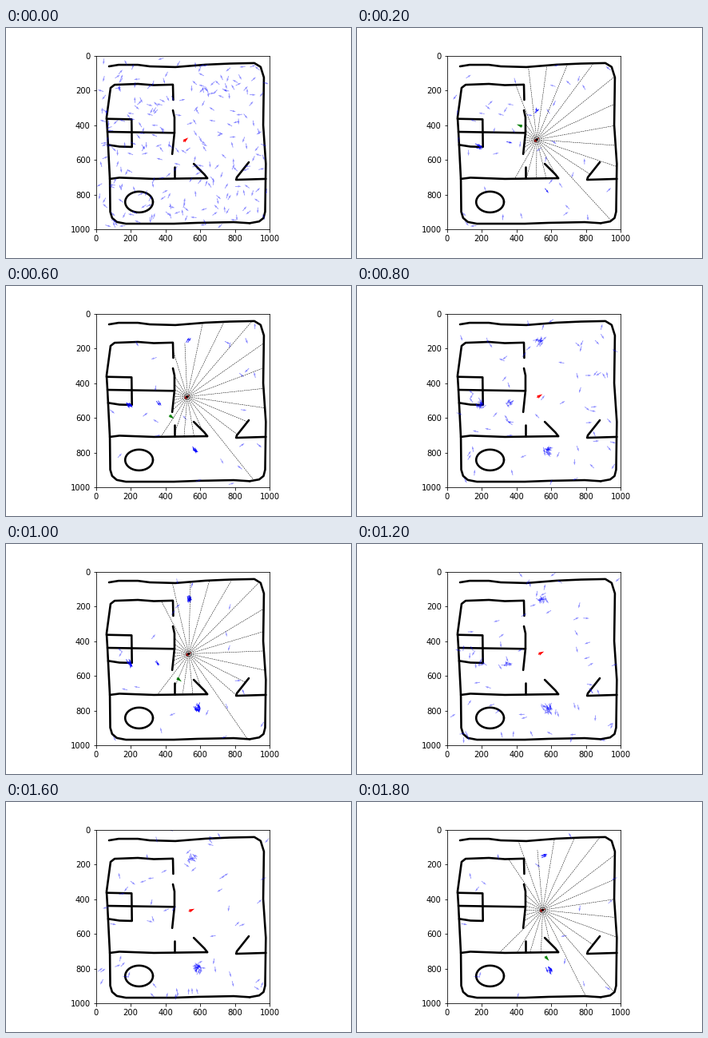
These frames come from a looping animation (432x288 px, 2 s). A matplotlib script:

```python
import numpy as np
import matplotlib.pyplot as plt
from matplotlib.animation import FuncAnimation

FRAMES, INTERVAL = 10, 200
SCALE = 4.6                        # map units per screen pixel
CORNER = np.array([112.7, 34.6])   # top left of the map on screen
RAYS = 25

# Floor plan, in map units
t = np.linspace(0, 2 * np.pi, 41)
table = np.column_stack([248 + 80 * np.cos(t), 843 + 60 * np.sin(t)])
north_east = [(75, 62), (130, 53), (241, 53), (310, 62), (457, 66), (632, 52),
              (770, 46), (912, 43), (948, 65), (967, 126), (963, 400), (978, 623),
              (974, 899), (965, 935), (940, 955), (885, 965)]
south_west = [(885, 965), (793, 959), (586, 963), (448, 968), (172, 968),
              (120, 958), (93, 935), (82, 899), (80, 715), (66, 439), (61, 356),
              (84, 186), (107, 168), (241, 163), (333, 170), (443, 167), (445, 255)]
partition = [(443, 315), (452, 356), (452, 443), (439, 567)]
divider = [(66, 439), (452, 445)]
closet = [(61, 364), (205, 367), (207, 526), (135, 524), (70, 514)]
hall = [(80, 710), (135, 703), (333, 710), (641, 706)]
stub = [(454, 640), (454, 706)]
left_door = [(563, 623), (625, 685), (641, 706)]
right_door = [(880, 614), (811, 701), (807, 715), (978, 710)]
WALLS = [np.array(w, float) for w in (
    north_east, south_west, partition, divider, closet, hall, stub,
    left_door, right_door, table)]
SEG_A = np.vstack([w[:-1] for w in WALLS])
SEG_D = np.vstack([np.diff(w, axis=0) for w in WALLS])

# Number of weak particles still visible after each measurement
WEAK = [43, 23, 21, 20, 17]
# Strong particles: x, y, heading, count when weighted, count when resampled
STRONG = [
    [(225.5, 103, 60, 2, 12), (191, 144, -15, 1, 4), (152.5, 148, -30, 4, 32),
     (236.5, 204, -45, 1, 13)],
    [(229, 68, 35, 2, 12), (192, 147, -55, 2, 6), (154, 149, -30, 6, 14),
     (238, 206, -35, 5, 16)],
    [(231, 69, -80, 9, 11), (190, 149, -60, 2, 6), (154.5, 149, -60, 6, 5),
     (239.5, 206, -60, 11, 18)],
    [(232, 71, -40, 3, 8), (240.5, 209, -60, 8, 18), (241, 203, 30, 1, 3)],
    [(234, 68, 20, 3, 8), (241, 211, -70, 6, 15)],
]
# Pose estimates: x, y, heading
ESTIMATE = [(203.5, 122, 160), (207.5, 164, -35), (217, 170, -40),
            (235.5, 190, -55), (238, 196, -50)]
# Rays that return too early: step -> (ray index, fraction)
SHORT = {1: (4, 0.74), 3: (23, 0.85), 4: (5, 0.86)}


def to_map(points):
    return (np.asarray(points, float) - CORNER) * SCALE


def robot_pose(step):
    return np.array([517 + 8.5 * step, 484 - 5.2 * step]), 39 - 4 * step


def cast(origin, angle):
    """Direction and distance to the nearest wall along a screen angle."""
    ray = np.array([np.cos(angle), -np.sin(angle)])
    gap = SEG_A - origin
    det = ray[0] * SEG_D[:, 1] - ray[1] * SEG_D[:, 0]
    det = np.where(abs(det) < 1e-9, 1e-9, det)
    dist = (gap[:, 0] * SEG_D[:, 1] - gap[:, 1] * SEG_D[:, 0]) / det
    along = (gap[:, 0] * ray[1] - gap[:, 1] * ray[0]) / det
    hit = dist[(dist > 0) & (along >= 0) & (along <= 1)]
    return ray, hit.min() if hit.size else 600


def arrows(points, headings, color, width, length):
    rad = np.radians(headings)
    return ax.quiver(points[:, 0], points[:, 1], np.cos(rad), np.sin(rad),
                     color=color, units='width', width=width, pivot='mid',
                     scale_units='width', scale=217.4 / length, zorder=1)


def scatter(n, rng):
    return rng.uniform(15, 985, (n, 2)), rng.uniform(0, 360, n)


def weak_particles(step):
    return scatter(WEAK[step], np.random.default_rng(40 + step))


def clusters(step, resampled, rng):
    points, headings = [], []
    for x, y, heading, seen, copies in STRONG[step]:
        n = copies if resampled else seen
        spread = 2.6 if resampled else 0.5 + 0.16 * n
        points.append(to_map(rng.normal((x, y), spread, (n, 2))))
        headings.append(rng.normal(heading, 60 if resampled else 22, n))
    return np.vstack(points), np.concatenate(headings)


def particles(i):
    """Positions, headings and opacities for one frame."""
    rng = np.random.default_rng(7 + i)
    step = i // 2
    points, headings = weak_particles(step)
    if i % 2:
        alpha = rng.uniform(0.38, 0.52, len(points))
        near, turn = clusters(step, False, rng)
        return (np.vstack([points, near]), np.append(headings, turn),
                np.append(alpha, np.full(len(near), 0.85)))

    groups = [(points, headings), scatter(12 if step else 210, rng)]
    if step:
        old, old_turn = weak_particles(step - 1)
        pick = np.append(np.arange(len(old)), rng.integers(0, len(old), len(old) // 2))
        groups.append((old[pick] + rng.normal(0, 14, (len(pick), 2)),
                       old_turn[pick] + rng.normal(0, 20, len(pick))))
        groups.append(clusters(step - 1, True, rng))
    points = np.vstack([g[0] for g in groups])
    return points, np.concatenate([g[1] for g in groups]), np.full(len(points), 0.45)


def draw(i):
    while artists:
        artists.pop().remove()
    step = i // 2
    points, headings, alpha = particles(i)
    colors = np.column_stack([np.zeros((len(alpha), 2)), np.ones(len(alpha)), alpha])
    artists.append(arrows(points, headings, colors, 0.0038, 7.5))

    pos, heading = robot_pose(step)
    artists.append(arrows(pos[None], [heading], 'red', 0.0065, 8))
    if i % 2:
        x, y, turn = ESTIMATE[step]
        artists.append(arrows(to_map([(x, y)]), [turn], 'green', 0.0065, 7.5))
        index, part = SHORT.get(step, (-1, 1))
        for k in range(RAYS):
            ray, dist = cast(pos, np.radians(heading + 360 / RAYS * k))
            end = pos + ray * dist * (part if k == index else 0.99)
            artists.extend(ax.plot(*zip(pos, end), 'k--', lw=0.5, zorder=2))
    return artists


fig, ax = plt.subplots(figsize=(6, 4), dpi=72)
fig.subplots_adjust(left=0.125, right=0.9, bottom=0.125, top=0.88)
ax.set_aspect('equal')
ax.set(xlim=(0, 1000), ylim=(1000, 0), xticks=range(0, 1001, 200),
       yticks=range(0, 1001, 200))
ax.set_autoscale_on(False)
for wall in WALLS:
    ax.plot(*wall.T, color='black', lw=2.6, zorder=0.5,
            solid_capstyle='round', solid_joinstyle='round')

artists = []
anim = FuncAnimation(fig, draw, frames=FRAMES, interval=INTERVAL,
                     init_func=lambda: draw(0), repeat=True, repeat_delay=0)
plt.show()
```
